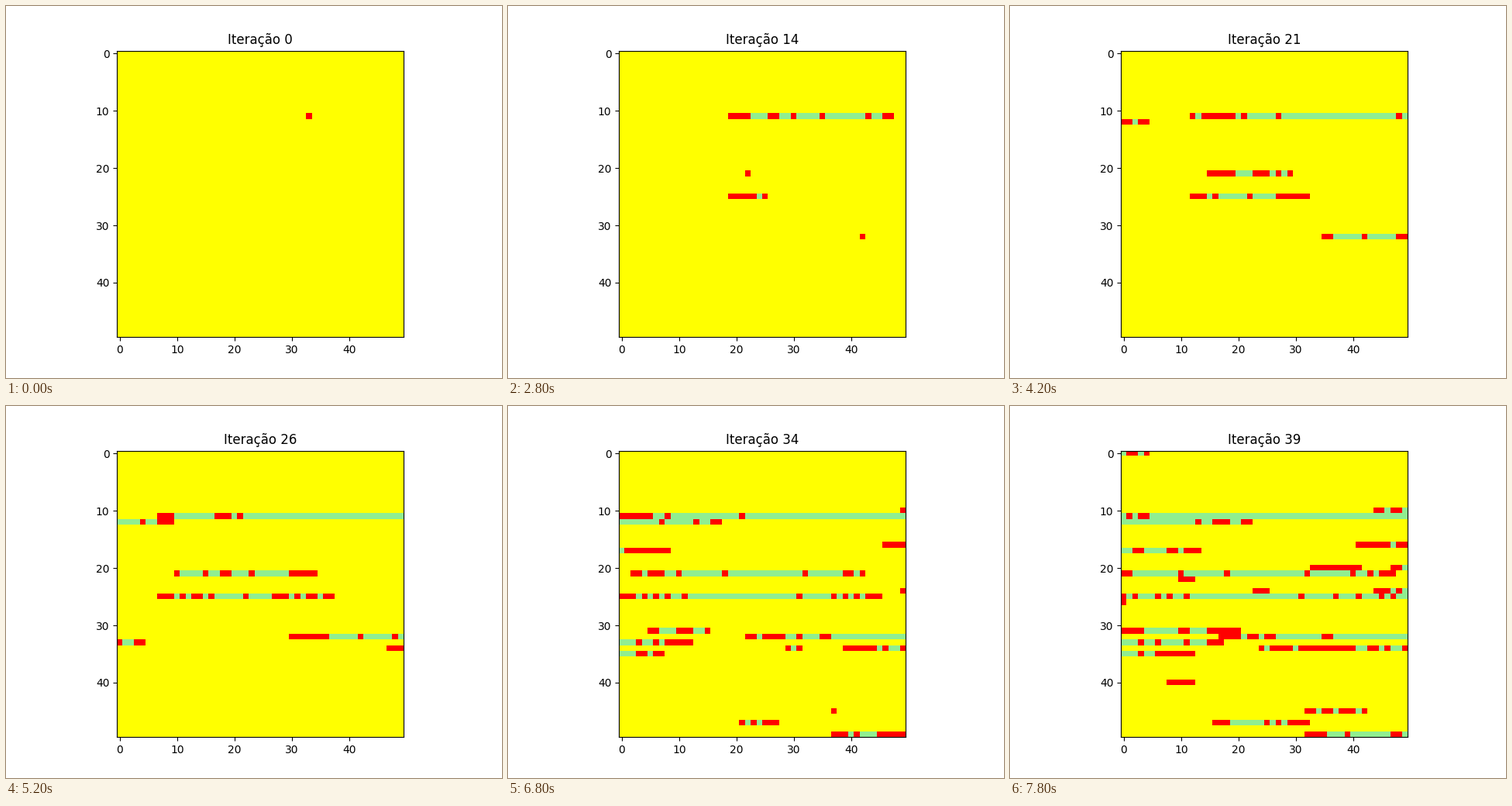
A matplotlib script that plays this animation: 640 px wide and 480 px high, repeating every 8 s.

```python
import numpy as np
import matplotlib.pyplot as plt
from matplotlib.animation import FuncAnimation
from matplotlib.colors import ListedColormap

SIZE = 50
STEPS = 40
RECOVERY = 0.12  # chance per step that a burning cell recovers

# Sparks: row, column, step of ignition
SPARKS = [
    (11, 33, 0), (25, 22, 11), (21, 22, 14), (32, 42, 14), (34, 48, 25),
    (17, 2, 28), (49, 43, 28), (31, 10, 29), (47, 24, 31), (34, 30, 33),
    (45, 37, 34), (20, 37, 35), (40, 10, 37), (22, 11, 38), (24, 24, 38),
]


def ignition_steps():
    """Fire runs one cell per step both ways along the rows laid end to end."""
    total = SIZE * SIZE
    cells = np.arange(total)
    start = np.full(total, STEPS)
    for row, col, step in SPARKS:
        gap = np.abs(cells - (row * SIZE + col))
        start = np.minimum(start, step + np.minimum(gap, total - gap))
    return start.reshape(SIZE, SIZE)


rng = np.random.default_rng(11)
ignite = ignition_steps()
recover = ignite + rng.geometric(RECOVERY, ignite.shape)


def forest(step):
    # 0 untouched, 1 burning, 2 recovered
    return (step >= ignite).astype(int) + (step >= recover)


fig, ax = plt.subplots(figsize=(6.4, 4.8), dpi=100)
image = ax.imshow(forest(0), vmin=0, vmax=2,
                  cmap=ListedColormap(["yellow", "red", "lightgreen"]))
title = ax.set_title("Iteração 0")


def update(step):
    image.set_data(forest(step))
    title.set_text(f"Iteração {step}")
    return image, title


anim = FuncAnimation(fig, update, frames=STEPS, interval=200,
                     repeat=True, repeat_delay=0)
plt.show()
```
